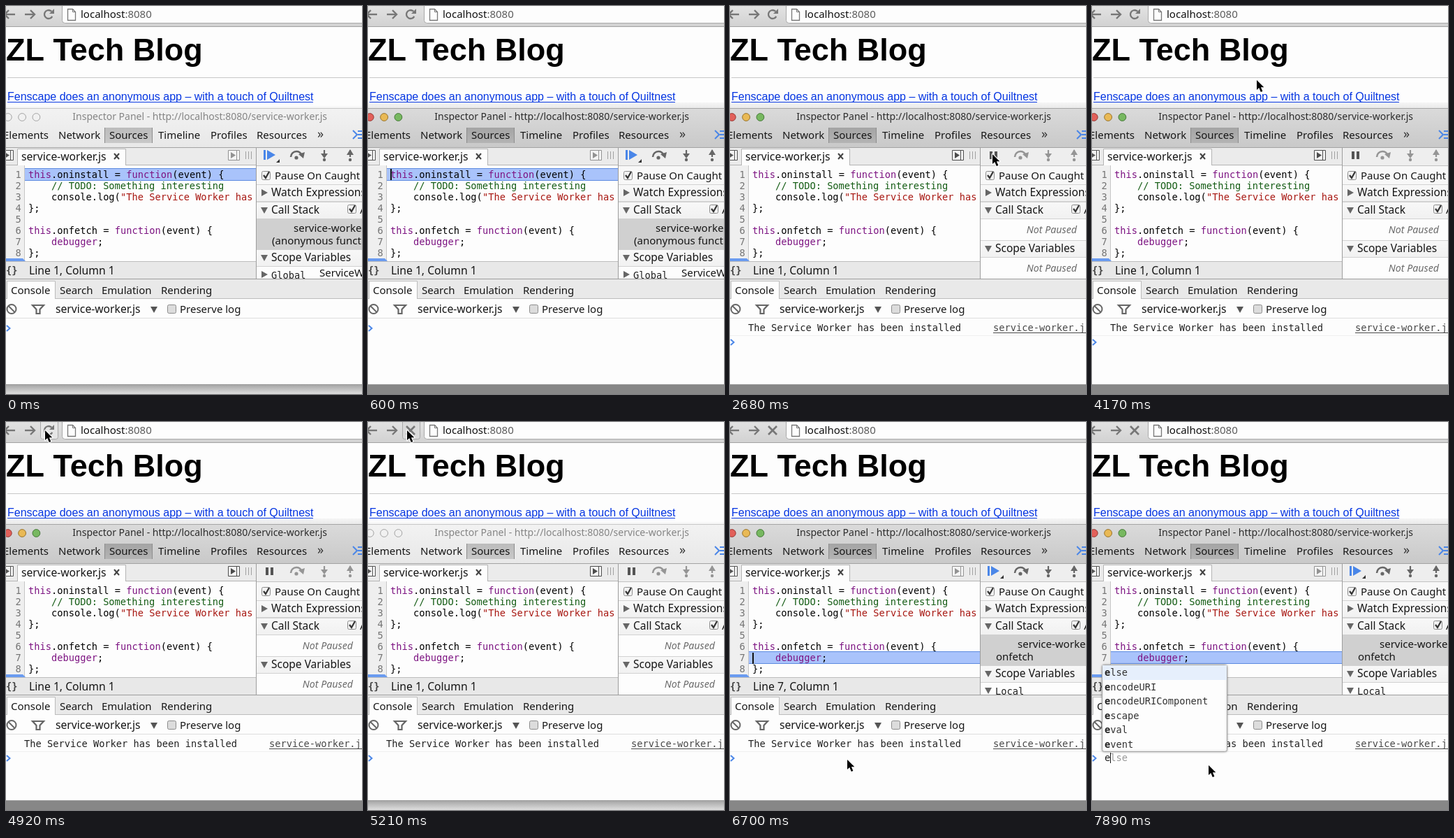
Recreate the animation shown at these times as an HTML page with a canvas. Size 510x555 px, loop 8 s.

```html
<!DOCTYPE html>
<html lang="en">
<head>
<meta charset="utf-8">
<title>Service worker debugging</title>
<style>
html, body { margin: 0; width: 100%; height: 100%; overflow: hidden; background: #fdfdfd; }
canvas { display: block; width: 510px; height: 555px; }
</style>
</head>
<body>
<canvas id="stage" width="510" height="555"></canvas>
<script>
const ctx = document.getElementById('stage').getContext('2d', { alpha: false });
const LOOP = 8000;
const SANS = '"Noto Sans", "Open Sans", sans-serif';
const MONO = '"DejaVu Sans Mono", monospace';
const ARIAL = '"Liberation Sans", Arial, sans-serif';
const CHAR = 8.25;
const WHITE = '#fdfdfd', BLUE = '#4a86e8', LINK = '#0435e2';
const KEYWORD = '#7d1482', COMMENT = '#145c14', STRING = '#a81812';

// Pointer tip positions: time, x, y
const POINTER = [
  [1050, 500, 238], [1200, 480, 232], [1350, 457, 225], [1500, 432, 217],
  [1640, 408, 210], [1790, 390, 204], [1940, 379, 208], [2090, 376, 212],
  [3720, 374, 211], [4020, 302, 152], [4170, 236, 106],
  [4470, 221, 96], [4620, 160, 62], [4770, 92, 26], [4920, 56, 12],
  [5810, 74, 48], [5960, 132, 200], [6100, 169, 332],
  [6400, 169, 410], [6550, 169, 462], [6700, 168, 483],
  [6850, 168, 497], [7000, 167, 491]
];

const CODE = [
  [['this', KEYWORD], ['.oninstall = '], ['function', KEYWORD], ['(event) {']],
  [['    // TODO: Something interesting', COMMENT]],
  [['    console.log('], ['"The Service Worker has been', STRING]],
  [['};']],
  [],
  [['this', KEYWORD], ['.onfetch = '], ['function', KEYWORD], ['(event) {']],
  [['    debugger', KEYWORD], [';']],
  [['};']]
];
const WORDS = ['else', 'encodeURI', 'encodeURIComponent', 'escape', 'eval', 'event'];

const between = (t, a, b) => t >= a && t < b;

function box(x, y, w, h, fill) {
  ctx.fillStyle = fill;
  ctx.fillRect(x, y, w, h);
}
function shade(x, y, w, h, top, bottom) {
  const g = ctx.createLinearGradient(0, y, 0, y + h);
  g.addColorStop(0, top);
  g.addColorStop(1, bottom);
  box(x, y, w, h, g);
}
function frame(x, y, w, h, fill, stroke, r = 0) {
  ctx.beginPath();
  ctx.roundRect(x + .5, y + .5, w - 1, h - 1, r);
  ctx.fillStyle = fill;
  ctx.fill();
  ctx.strokeStyle = stroke;
  ctx.lineWidth = 1;
  ctx.stroke();
}
function text(s, x, y, { size = 15, font = SANS, color = '#161616', style = '', align = 'left' } = {}) {
  ctx.font = `${style} ${size}px ${font}`;
  ctx.textAlign = align;
  ctx.fillStyle = color;
  ctx.fillText(s, x, y);
}
const mono = (s, x, y, color = '#000', style = '') => text(s, x, y, { size: 13.7, font: MONO, color, style });

function poly(points, fill) {
  ctx.beginPath();
  points.forEach(([x, y]) => ctx.lineTo(x, y));
  ctx.closePath();
  ctx.fillStyle = fill;
  ctx.fill();
}
function line(points, color, width = 1) {
  ctx.beginPath();
  points.forEach(([x, y], i) => i ? ctx.lineTo(x, y) : ctx.moveTo(x, y));
  ctx.strokeStyle = color;
  ctx.lineWidth = width;
  ctx.stroke();
}
function disc(x, y, r, fill, stroke) {
  ctx.beginPath();
  ctx.arc(x, y, r, 0, 7);
  ctx.fillStyle = fill;
  ctx.fill();
  if (!stroke) return;
  ctx.strokeStyle = stroke;
  ctx.lineWidth = 1;
  ctx.stroke();
}
const down = (x, y, c = '#666') => poly([[x - 5, y - 4], [x + 5, y - 4], [x, y + 5]], c);
const right = (x, y, c = '#666') => poly([[x - 4, y - 5], [x + 5, y], [x - 4, y + 5]], c);

function checkbox(x, y, checked) {
  frame(x, y, 13, 13, checked ? '#f2f2f2' : '#dcdcdc', '#8c8c8c', 2);
  if (checked) line([[x + 3, y + 6], [x + 6, y + 10], [x + 11, y + 1]], '#333', 2.2);
}
function toggleIcon(x, y, color) {
  frame(x, y, 17, 15, '#f4f4f4', color);
  poly([[x + 4, y + 3], [x + 11, y + 7.5], [x + 4, y + 12]], color);
  box(x + 12, y + 1, 1, 13, color);
}

function drawBrowser(t) {
  shade(0, 0, 510, 29, '#e2e2e2', '#d2d2d2');
  box(0, 29, 510, 1, '#a2a2a2');
  ctx.beginPath();
  ctx.roundRect(80.5, -8, 450, 32.5, 4);
  ctx.fillStyle = WHITE;
  ctx.fill();
  ctx.strokeStyle = '#a8a8a8';
  ctx.lineWidth = 1;
  ctx.stroke();

  const ink = '#777';
  line([[-2, 12], [13, 12]], ink, 2.4);
  line([[4, 6], [-2, 12], [4, 18]], ink, 2.4);
  line([[27, 12], [41, 12]], ink, 2.4);
  line([[35, 6], [41, 12], [35, 18]], ink, 2.4);

  if (between(t, 4920, 5810)) frame(49, -4, 26, 29, t < 5210 ? '#e6e6e6' : '#dadada', '#a9a9a9', 3);
  if (t < 5210) {
    ctx.beginPath();
    ctx.arc(61, 12, 6, .5, 5.5);
    ctx.strokeStyle = ink;
    ctx.lineWidth = 2.3;
    ctx.stroke();
    poly([[69, 4], [69, 11], [62, 11]], ink);
  } else {
    line([[55, 6], [67, 18]], ink, 2.6);
    line([[67, 6], [55, 18]], ink, 2.6);
  }

  ctx.beginPath();
  [[88, 4], [95, 4], [99, 8], [99, 20], [88, 20]].forEach(([x, y]) => ctx.lineTo(x + .5, y + .5));
  ctx.closePath();
  ctx.strokeStyle = '#777';
  ctx.lineWidth = 1.3;
  ctx.stroke();
  line([[95.5, 4], [95.5, 8.5], [99, 8.5]], '#777');
  text('localhost', 107, 17, { color: '#111' });
  text(':8080', 107 + ctx.measureText('localhost').width, 17, { color: '#5c5c5c' });

  box(0, 30, 510, 117, WHITE);
  text('ZL Tech Blog', 0, 78, { size: 45, font: ARIAL, color: '#000', style: 'bold' });
  box(2, 102, 508, 1, '#c8c8c8');
  text('Fenscape does an anonymous app – with a touch of Quiltnest', 2, 135, { size: 16, font: ARIAL, color: LINK });
  box(2, 137, 438, 1, LINK);
}

function drawWindow(active) {
  if (active) {
    shade(0, 138, 510, 8, 'rgba(0,0,0,.03)', 'rgba(0,0,0,.08)');
    box(0, 542, 510, 13, '#878787');
  } else {
    shade(0, 142, 510, 4, 'rgba(0,0,0,0)', 'rgba(0,0,0,.04)');
    shade(0, 542, 510, 13, '#a6a6a6', '#dedede');
  }
  box(0, 541, 510, 1, '#9a9a9a');
  box(0, 146, 510, 1, active ? '#a5a5a5' : '#c8c8c8');
  if (active) shade(0, 147, 510, 55, '#dadada', '#c9c9c9');
  else shade(0, 147, 510, 55, '#f2f2f2', '#e8e8e8');
  box(0, 202, 510, 1, '#a3a3a3');

  const lights = active ? [['#e2605a', '#963a36'], ['#e9b955', '#98732c'], ['#77b860', '#46793a']]
                        : Array(3).fill(['#f1f1f1', '#a4a4a4']);
  lights.forEach(([fill, edge], i) => disc(2.8 + i * 20.3, 159, 5.4, fill, edge));
  text('Inspector Panel - http://localhost:8080/service-worker.js', 460, 163,
    { size: 14, color: active ? '#2c2c2c' : '#858585', align: 'right' });

  if (active) shade(141, 174, 69, 22, '#a4a4a4', '#b4b4b4');
  else shade(141, 174, 69, 22, '#bcbcbc', '#c8c8c8');
  box(141, 174, 1, 22, '#8d8d8d');
  box(209, 174, 1, 22, '#8d8d8d');
  [['Elements', -4], ['Network', 75], ['Sources', 148], ['Timeline', 218], ['Profiles', 293], ['Resources', 359]]
    .forEach(([s, x]) => text(s, x, 190));
  text('»', 446, 189, { size: 18, color: '#333' });
  line([[497, 178], [503, 184], [497, 190]], BLUE, 2);
  [179, 184, 189].forEach(y => box(504, y - 1, 6, 2, BLUE));
}

function drawSource(t, pausedLine) {
  box(0, 203, 358, 25, '#ebebeb');
  toggleIcon(-6, 206, '#555');
  frame(16, 204, 156, 26, WHITE, '#b4b4b4');
  text('service-worker.js', 22, 221, { size: 15.7 });
  line([[155, 211], [162, 219]], '#444', 2);
  line([[162, 211], [155, 219]], '#444', 2);
  toggleIcon(318, 206, pausedLine ? '#929292' : '#4c4c4c');
  for (let x = 343; x < 354; x += 4) box(x, 208, 1, 11, '#a0a0a0');
  box(0, 227, 16, 1, '#b4b4b4');
  box(172, 227, 186, 1, '#b4b4b4');

  box(0, 228, 358, 137, WHITE);
  box(0, 228, 26, 137, '#efefef');
  box(26, 228, 1, 137, '#c6c6c6');
  if (pausedLine) {
    const y = 216 + pausedLine * 16;
    box(27, y, 331, 18, '#a9c3fb');
    box(27, y, 331, 1, '#5c8ae0');
    box(27, y + 17, 331, 1, '#5c8ae0');
  }
  ctx.save();
  ctx.beginPath();
  ctx.rect(0, 228, 356, 137);
  ctx.clip();
  CODE.forEach((parts, i) => {
    const y = 246 + i * 16;
    mono(String(i + 1), 13.5, y, '#747474');
    let x = 32;
    for (const [s, color] of parts) {
      mono(s, x, y, color);
      x += s.length * CHAR;
    }
  });
  ctx.restore();
  poly([[0, 361], [24, 361], [28, 365], [0, 365]], '#6a9bf0');

  if (between(t, 600, 1050) || between(t, 1500, 2000)) box(32, 233, 2, 16, '#111');
  if (between(t, 5360, 5810) || between(t, 6400, 6850)) box(32, 330, 2, 16, '#111');

  box(0, 365, 358, 25, '#e8e8e8');
  box(0, 365, 358, 1, '#bdbdbd');
  mono('{}', 0, 383, '#444', 'bold');
  text(`Line ${pausedLine || 1}, Column 1`, 33, 384, { size: 15.7 });
}

function stepArrow(x, up, color) {
  const d = up ? -1 : 1, y = 212;
  line([[x, y - 6], [x, y + 4]], color, 2.2);
  poly([[x - 5, y - d], [x + 5, y - d], [x, y + d * 6 - (up ? 1 : 0)]], color);
  disc(x, y + 8, 2.2, color);
}

function drawSidebar(pausedLine) {
  box(358, 203, 1, 187, '#9d9d9d');
  box(359, 203, 151, 25, '#eee');
  const ink = pausedLine ? '#666' : '#959595';
  if (pausedLine) {
    box(369, 206, 3, 14, BLUE);
    poly([[374, 206], [386, 213], [374, 220]], BLUE);
    poly([[392, 219], [392, 224], [387, 224]], '#333');
  } else {
    box(372, 208, 4, 11, '#555');
    box(379, 208, 4, 11, '#555');
  }
  ctx.beginPath();
  ctx.arc(416, 216, 8, Math.PI, 5.9);
  ctx.strokeStyle = ink;
  ctx.lineWidth = 2.5;
  ctx.stroke();
  poly([[419, 212], [428, 209], [426, 218]], ink);
  disc(416, 217, 2.6, ink);
  stepArrow(456, false, ink);
  stepArrow(493, true, ink);
  box(359, 228, 151, 1, '#c2c2c2');

  const header = (y, label, open = true) => {
    shade(359, y, 151, 24, '#f8f8f8', '#f1f1f1');
    box(359, y, 151, 1, '#d2d2d2');
    box(359, y + 24, 151, 1, '#d2d2d2');
    (open ? down : right)(370, y + 12);
    text(label, 380, y + 17, { size: 15.5 });
  };
  const idle = y => text('Not Paused', 497, y, { size: 14.2, color: '#6a6a6a', style: 'italic', align: 'right' });

  box(359, 229, 151, 161, WHITE);
  box(359, 229, 151, 26, '#f8f8f8');
  checkbox(366, 236, true);
  text('Pause On Caught Exceptions', 385, 248);
  header(255, 'Watch Expressions', false);
  header(280, 'Call Stack');
  checkbox(489, 284, true);
  text('Async', 507, 297);

  if (!pausedLine) {
    idle(325);
    header(335, 'Scope Variables');
    idle(380);
    return;
  }
  box(359, 304, 151, 44, '#d0d0d0');
  text('service-worker.js:' + pausedLine, 412, 323);
  text(pausedLine === 1 ? '(anonymous function)' : 'onfetch', 381, 341);
  header(348, 'Scope Variables');
  if (pausedLine === 1) {
    right(370, 384);
    mono('Global', 380, 390, '#222');
    text('ServiceWorker', 449, 387);
  } else {
    down(370, 384);
    mono('Local', 380, 390, '#222');
  }
}

function drawConsole(t) {
  box(0, 390, 510, 29, '#e9e9e9');
  box(0, 390, 510, 1, '#9d9d9d');
  box(0, 418, 510, 1, '#bcbcbc');
  frame(1, 393, 70, 28, WHITE, '#bcbcbc');
  box(0, 419, 510, 122, WHITE);
  box(0, 446, 510, 1, '#dedede');
  [['Console', 7], ['Search', 77], ['Emulation', 137], ['Rendering', 222]]
    .forEach(([s, x]) => text(s, x, 412));

  ctx.beginPath();
  ctx.arc(8, 433.5, 6.5, 0, 7);
  ctx.strokeStyle = '#666';
  ctx.lineWidth = 2;
  ctx.stroke();
  line([[3.5, 429], [12.5, 438]], '#666', 2);
  line([[38, 428], [54, 428], [48.5, 434], [48.5, 440], [43.5, 440], [43.5, 434], [38, 428], [54, 428]], '#666', 2.2);
  text('service-worker.js', 71, 438.5, { size: 15.7 });
  down(212, 434, '#555');
  checkbox(231, 427, false);
  text('Preserve log', 249, 439);

  const installed = t >= 2680;
  if (installed) {
    mono('The Service Worker has been installed', 26, 465, '#222');
    mono('service-worker.js:3', 377, 465, '#484848');
    box(377, 467, 133, 1, '#484848');
    box(0, 471, 510, 1, '#f0f0f0');
  }
  const y = installed ? 481 : 461;
  line([[1, y - 4], [5.5, y], [1, y + 4]], BLUE, 2);

  if (t >= 7590) mono('e', 18, 485, '#222');
  if (t >= 7890) mono('lse', 18 + CHAR, 485, '#999');
  if (between(t, 7140, 7590)) box(18, 473, 1, 15, '#111');
  if (t >= 7590) box(26, 473, 1, 15, '#111');
}

function drawCompletions() {
  ctx.save();
  ctx.shadowColor = 'rgba(0,0,0,.3)';
  ctx.shadowBlur = 3;
  frame(14, 347, 180, 125, WHITE, '#a5a5a5', 3);
  ctx.restore();
  box(15, 348, 178, 21, '#e6effc');
  WORDS.forEach((word, i) => {
    const y = 363 + i * 20.5;
    mono(word[0], 18, y, '#222', 'bold');
    mono(word.slice(1), 18 + CHAR, y, '#333');
  });
}

function drawPointer(t) {
  const spot = POINTER.findLast(([start]) => t >= start);
  if (!spot) return;
  const [, x, y] = spot;
  ctx.beginPath();
  [[0, 0], [0, 14], [3.2, 11], [5.8, 17], [8.4, 16], [5.9, 10.2], [10.3, 10.2]]
    .forEach(([dx, dy]) => ctx.lineTo(x + dx, y + dy));
  ctx.closePath();
  ctx.lineJoin = 'round';
  ctx.strokeStyle = '#fff';
  ctx.lineWidth = 2.4;
  ctx.stroke();
  ctx.lineJoin = 'miter';
  ctx.fillStyle = '#000';
  ctx.fill();
}

function draw(t) {
  const active = !(t < 600 || between(t, 5210, 5360));
  const pausedLine = t < 2680 ? 1 : t < 5360 ? 0 : 7;
  drawBrowser(t);
  drawWindow(active);
  drawSource(t, pausedLine);
  drawSidebar(pausedLine);
  drawConsole(t);
  if (t >= 7890) drawCompletions();
  drawPointer(t);
}

const start = performance.now();
function tick() {
  draw((performance.now() - start) % LOOP);
  requestAnimationFrame(tick);
}
tick();
</script>
</body>
</html>
```
